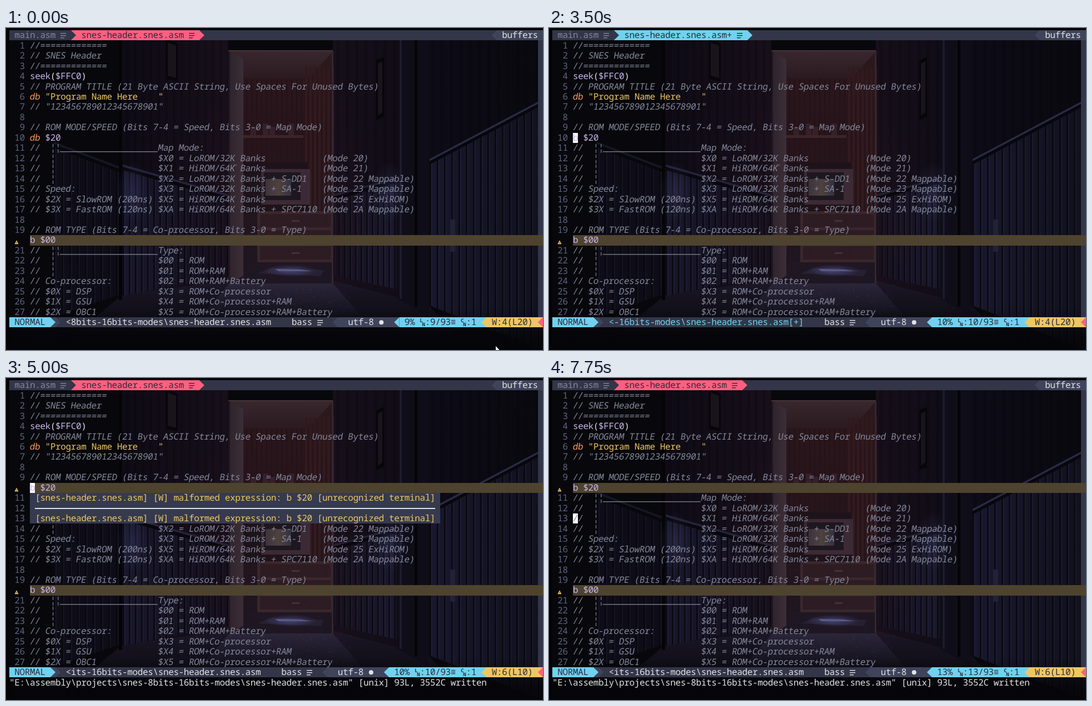
These frames come from a looping animation (966 px wide and 580 px high, 8 s). An HTML page with a canvas:

```html
<!DOCTYPE html>
<html lang="en">
<head>
<meta charset="utf-8">
<title>Editor session</title>
<style>
html, body { margin: 0; width: 100%; height: 100%; overflow: hidden; background: #050507; }
canvas { display: block; }
</style>
</head>
<body>
<canvas id="stage" width="966" height="580"></canvas>
<script>
const W = 966, H = 580, LOOP = 8000;
const CW = 960 / 104, RH = CW * 2, X0 = 6, Y0 = 4, SLANT = 0.17;
const FONT = '"Noto Sans Mono", "DejaVu Sans Mono", monospace';
const C = {
  fg: '#e1e3e4', dark: '#2b2d3a', grey: '#83879a', num: '#5f6380', bar: '#333648', seg: '#3f445b',
  pink: '#fd6080', cyan: '#70d2f0', yellow: '#edc763', orange: '#f89860', lilac: '#c6b6ea',
  warn: '#4e432f', popup: '#363a4e'
};
const g = document.getElementById('stage').getContext('2d');
const X = c => X0 + c * CW, Y = r => Y0 + r * RH;

// ---- file contents ----
const cols = (a, b = '', c = '') => a.padEnd(25) + b.padEnd(32) + c;
const bars = '//  ¦¦' + '_'.repeat(19);
const rule = '//' + '='.repeat(13);
const code = [
  rule, '// SNES Header', rule, 'seek($FFC0)',
  '// PROGRAM TITLE (21 Byte ASCII String, Use Spaces For Unused Bytes)',
  'db "Program Name Here    "', '// "123456789012345678901"', '',
  '// ROM MODE/SPEED (Bits 7-4 = Speed, Bits 3-0 = Map Mode)', 'db $20',
  bars + 'Map Mode:',
  cols('//  ¦', '$X0 = LoROM/32K Banks', '(Mode 20)'),
  cols('//  ¦', '$X1 = HiROM/64K Banks', '(Mode 21)'),
  cols('//  ¦', '$X2 = LoROM/32K Banks + S-DD1', '(Mode 22 Mappable)'),
  cols('// Speed:', '$X3 = LoROM/32K Banks + SA-1', '(Mode 23 Mappable)'),
  cols('// $2X = SlowROM (200ns)', '$X5 = HiROM/64K Banks', '(Mode 25 ExHiROM)'),
  cols('// $3X = FastROM (120ns)', '$XA = HiROM/64K Banks + SPC7110', '(Mode 2A Mappable)'),
  '', '// ROM TYPE (Bits 7-4 = Co-processor, Bits 3-0 = Type)', 'b $00',
  bars + 'Type:',
  cols('//  ¦', '$00 = ROM'),
  cols('//  ¦', '$01 = ROM+RAM'),
  cols('// Co-processor:', '$02 = ROM+RAM+Battery'),
  cols('// $0X = DSP', '$X3 = ROM+Co-processor'),
  cols('// $1X = GSU', '$X4 = ROM+Co-processor+RAM'),
  cols('// $2X = OBC1', '$X5 = ROM+Co-processor+RAM+Battery')
];
const path = 'projects\\snes-8bits-16bits-modes\\snes-header.snes.asm';
const written = `"E:\\assembly\\${path}" [unix] 93L, 3552C written`;
const warning = '[snes-header.snes.asm] [W] malformed expression: b $20 [unrecognized terminal]';

// ---- drawing helpers ----
function text(s, c, r, color, italic) {
  g.font = '16px ' + FONT;
  g.letterSpacing = '0px';
  g.letterSpacing = CW - g.measureText('0').width + 'px';
  g.fillStyle = color;
  g.save();
  g.translate(X(c), Y(r) + 14.2);
  // lean about the middle of the letters
  if (italic) g.transform(1, 0, -SLANT, 1, -SLANT * 5.5, 0);
  g.fillText(s, 0, 0);
  g.restore();
}
function cells(c0, c1, r, color, rows = 1) {
  const x = Math.round(X(c0)), y = Math.round(Y(r));
  g.fillStyle = color;
  g.fillRect(x, y, Math.round(X(c1)) - x, Math.round(Y(r + rows)) - y);
}
function poly(ctx, color, ...p) {
  ctx.fillStyle = color;
  ctx.beginPath();
  for (let i = 0; i < p.length; i += 2) ctx.lineTo(p[i], p[i + 1]);
  ctx.fill();
}
// arrow one cell wide; dir 1 points right, -1 left
function arrow(c, r, color, dir) {
  const a = dir > 0 ? c : c + 1, y = Math.round(Y(r)), b = Math.round(Y(r + 1));
  poly(g, color, X(a), y, X(a + dir), (y + b) / 2, X(a), b);
}
function listIcon(c, r, color) {
  g.fillStyle = color;
  [10, 10, 7].forEach((w, i) => g.fillRect(Math.round(X(c)), Math.round(Y(r)) + 5 + i * 4, w, 1.4));
}
function stacked(a, b, c, r) {
  g.font = 'bold 9px ' + FONT;
  g.letterSpacing = '0px';
  g.fillStyle = C.dark;
  g.fillText(a, X(c), Y(r) + 9);
  g.fillText(b, X(c) + 4, Y(r) + 16.5);
}

// ---- dim hallway behind the text ----
function hallway() {
  const cv = document.createElement('canvas');
  cv.width = W; cv.height = H;
  const b = cv.getContext('2d');
  const fade = (x0, y0, x1, y1, ...stops) => {
    const f = b.createLinearGradient(x0, y0, x1, y1);
    stops.forEach((s, i) => f.addColorStop(i / (stops.length - 1), s));
    return f;
  };
  const box = (color, x, y, w, h) => { b.fillStyle = color; b.fillRect(x, y, w, h); };
  const glow = (x, y, rx, ry, rgb, a) => {
    b.save();
    b.translate(x, y); b.scale(rx, ry);
    const f = b.createRadialGradient(0, 0, 0, 0, 0, 1);
    f.addColorStop(0, `rgba(${rgb},${a})`); f.addColorStop(1, `rgba(${rgb},0)`);
    b.fillStyle = f; b.fillRect(-1, -1, 2, 2);
    b.restore();
  };
  // slanted panelling: top and bottom edges run linearly from x0 to x1
  const panels = (x0, x1, t0, t1, b0, b1, step, fill, line, rail) => {
    poly(b, fill, x0, t0, x1, t1, x1, b1, x0, b0);
    for (let x = x0; x < x1; x += step) {
      const k = (x - x0) / (x1 - x0), y = t0 + (t1 - t0) * k, h = b0 + (b1 - b0) * k - y;
      box(line, x, y, 2.5, h);
      box('rgba(80,78,130,.16)', x + 3, y, 1.5, h);
    }
    poly(b, rail, x0, t0, x1, t1, x1, t1 + 4, x0, t0 + 4);
    poly(b, '#07070c', x0, t0 + 4, x1, t1 + 4, x1, t1 + 10, x0, t0 + 10);
  };
  box('#08080c', 0, 0, W, H);
  box(fade(205, 0, 400, 0, '#0e0b15', '#180f1a'), 208, 0, 192, 480);
  box(fade(588, 0, 966, 0, '#170f1a', '#0d0b15', '#09090f'), 588, 0, 378, 500);
  for (let x = 216; x < 400; x += 14) box('rgba(0,0,0,.16)', x, 22, 5, 270);
  for (let x = 594; x < 966; x += 17) box('rgba(0,0,0,.16)', x, 22, 6, 270);
  poly(b, fade(0, 455, 0, 560, '#1b1726', '#08080d'), 210, 480, 400, 455, 588, 455, 760, 500, 840, 580, 90, 580);
  // left side
  panels(86, 204, 205, 250, 520, 480, 14, '#0e0d17', '#08080e', '#171624');
  box('#050508', 203, 22, 6, 468);
  panels(210, 400, 246, 300, 482, 446, 11, fade(210, 0, 400, 0, '#18172a', '#150f1b'), '#0a0911', '#25223a');
  poly(b, '#07060a', 288, 20, 309, 28, 309, 96, 288, 92);
  poly(b, '#19131c', 291, 26, 306, 32, 306, 90, 291, 86);
  glow(228, 295, 30, 55, '74,78,130', 0.28);
  // right side
  panels(588, 700, 300, 270, 446, 470, 10, fade(588, 0, 700, 0, '#160f1b', '#1a192d'), '#0b0a12', '#211e33');
  poly(b, '#07060a', 666, 58, 680, 52, 680, 160, 666, 166);
  poly(b, '#19131d', 669, 64, 677, 60, 677, 152, 669, 158);
  poly(b, '#0e0d18', 704, 22, 760, 22, 760, 520, 704, 488);
  box('#1d1a2e', 708, 22, 4, 466);
  box('#050508', 735, 22, 5, 480);
  panels(762, 966, 236, 128, 500, 580, 13, fade(762, 0, 966, 0, '#18172c', '#11111d'), '#08080e', '#2a2945');
  box('#222136', 799, 345, 9, 58);
  glow(690, 295, 30, 55, '74,78,130', 0.28);
  // lit room in the doorway
  box(fade(0, 42, 0, 460, '#2c191d', '#25131a', '#20141c', '#1a1521'), 402, 42, 186, 418);
  poly(b, fade(0, 42, 0, 90, '#38272c', '#2b1a20'), 402, 42, 588, 42, 545, 90, 427, 90);
  for (let x = 432; x < 536; x += 9) box('#211117', x, 92, 2, 166);
  for (let x = 538; x < 588; x += 8) box('#311a1d', x, 70, 4, 265);
  box('#3a2526', 427, 193, 108, 5);
  [440, 462, 474, 508].forEach((x, i) => box('#33202a', x, 178 - i % 2 * 6, 10, 15 + i % 2 * 6));
  box('#191118', 427, 242, 116, 92);
  box('#392a35', 459, 254, 88, 64);
  box('#18151f', 464, 260, 66, 50);
  box(fade(464, 0, 516, 0, '#37333e', '#4d4440', '#2d3042'), 467, 272, 46, 30);
  box('#38262b', 452, 330, 136, 92);
  [335, 364, 393].forEach(y => { box('#2a1b22', 457, y, 127, 24); box('#44313a', 514, y + 11, 14, 3); });
  poly(b, '#1c1622', 427, 422, 588, 422, 588, 460, 427, 460);
  poly(b, fade(402, 0, 427, 0, '#2d242d', '#3b2e37'), 403, 42, 427, 56, 427, 446, 403, 462);
  box('#4a3c40', 409, 245, 7, 4);
  box('#44343b', 400, 40, 188, 2);
  box('#1f1620', 400, 42, 3, 418);
  box('#35262e', 586, 42, 3, 418);
  poly(b, '#252033', 452, 442, 478, 432, 572, 436, 566, 447);
  glow(512, 437, 48, 11, '100,106,180', 0.5);
  poly(b, '#585c8c', 484, 434, 530, 435, 550, 438, 490, 438);
  poly(b, fade(0, 455, 0, 520, '#2b273b', '#12101a'), 402, 460, 588, 460, 640, 520, 350, 520);
  for (let i = 0; i < 260; i++) {
    const u = Math.sin(i * 78.233) * 43758.5 % 1, v = Math.sin(i * 12.99) * 9631.7 % 1;
    box('rgba(100,94,140,.13)', 495 + u * 125, 488 + v * 28, 3, 1);
  }
  glow(495, 300, 190, 240, '90,40,45', 0.1);
  box(fade(0, 505, 0, 560, 'rgba(5,5,8,0)', 'rgba(5,5,8,.85)'), 0, 505, W, 75);
  box('#040406', 0, 0, 6, H);
  box('#040406', 0, 0, W, 4);
  return cv;
}
const backdrop = hallway();

// ---- editor parts ----
function tabs(modified) {
  const end = modified ? 38 : 37, hot = modified ? C.cyan : C.pink;
  cells(0, 104, 0, C.bar);
  text('main.asm', 1, 0, C.grey);
  listIcon(10, 0, C.grey);
  cells(12, end, 0, hot);
  arrow(12, 0, C.bar, 1);
  arrow(end, 0, hot, 1);
  text('snes-header.snes.asm' + (modified ? '+' : ''), 14, 0, C.dark);
  listIcon(end - 2, 0, C.dark);
  cells(95, 104, 0, C.seg);
  arrow(94, 0, C.seg, -1);
  text('buffers', 96, 0, C.fg);
}

function codeLine(s, n) {
  if (s.startsWith('//')) {
    text(s.replace(/¦/g, ' '), 4, n, C.grey, true);
    for (let i = 4; i < 6; i++) if (s[i] === '¦') text('¦', 4 + i, n, C.grey);
  } else if (s.startsWith('db')) {
    text('db', 4, n, C.orange, true);
    text(s.slice(3), 7, n, s[3] === '"' ? C.yellow : C.lilac);
  } else {
    text(s.replace(/[()]/g, ' '), 4, n, C.lilac);
    text(s.replace(/[^()]/g, ' '), 4, n, C.fg);
  }
}

function buffer(st) {
  cells(103, 104, 1, C.bar, 27);
  code.forEach((s, i) => {
    const n = i + 1, bad = n === 20 || n === 10 && st.linted;
    if (bad) {
      cells(4, 104, n, C.warn);
      const y = Y(n) + 9;
      poly(g, C.yellow, 19, y, 22.5, y + 7, 15.5, y + 7);
      g.fillStyle = '#33291a';
      g.fillRect(18.5, y + 3, 1, 2.5);
    } else {
      text(String(n).padStart(2), 1, n, C.num);
    }
    if (st.cursor && st.line === n) cells(4, 5, n, '#fff');
    codeLine(n === 10 && st.cut ? s.slice(1) : s, n);
  });
}

function status(st) {
  const r = 28, pct = Math.floor(st.line / 93 * 100) + '%', pos = `:${st.line}/93`;
  const c = 86 - pct.length - 2 - pos.length;
  cells(0, 104, r, C.bar);
  cells(0, 8, r, C.cyan);
  text('NORMAL', 1, r, C.dark);
  cells(8, 9, r, C.seg);
  arrow(8, r, C.cyan, 1);
  arrow(9, r, C.seg, 1);
  const name = path + (st.modified ? '[+]' : '');
  text('<' + name.slice(38 - c), 11, r, st.modified ? C.cyan : C.fg);
  text('bass', c - 22, r, C.fg);
  listIcon(c - 17, r, C.fg);
  arrow(c - 14, r, C.seg, -1);
  cells(c - 13, c - 1, r, C.seg);
  text('utf-8', c - 11, r, C.fg);
  g.fillStyle = C.fg;
  g.beginPath();
  g.arc(X(c - 4.5), Y(r + 0.5), 4, 0, 7);
  g.fill();
  arrow(c - 2, r, C.cyan, -1);
  cells(c - 1, 93, r, C.cyan);
  text(pct, c, r, C.dark);
  stacked('L', 'N', c + pct.length + 1, r);
  text(pos + '≡', 86 - pos.length, r, C.dark);
  stacked('C', 'N', 88, r);
  text(':1', 89, r, C.dark);
  arrow(92, r, C.yellow, -1);
  cells(93, 104, r, C.yellow);
  text(st.linted ? 'W:6(L10)' : 'W:4(L20)', 94, r, C.dark);
  arrow(103, r, C.pink, -1);
}

function popup() {
  cells(4, 84, 11, C.popup, 3);
  text(warning, 5, 11, C.yellow);
  text(warning, 5, 13, C.yellow);
  g.fillStyle = C.fg;
  g.fillRect(52, 234, 720, 2);
}

function pointer(x, y) {
  poly(g, '#fff', x, y, x, y + 14, x + 3.3, y + 11, x + 9.5, y + 10);
}
function beam(x, y) {
  g.fillStyle = '#fff';
  g.fillRect(x, y, 5, 1);
  g.fillRect(x + 2, y, 1, 16);
  g.fillRect(x, y + 15, 5, 1);
}

function draw(t) {
  const within = (a, b) => t >= a && t < b;
  const st = {
    line: t < 2000 ? 9 : t < 6750 ? 10 : t < 7500 ? 9 : t < 7750 ? 11 : 13,
    cursor: t >= 500 && !within(4500, 4750),
    cut: t >= 3500,
    modified: within(3500, 4750),
    linted: t >= 4750
  };
  g.drawImage(backdrop, 0, 0);
  tabs(st.modified);
  buffer(st);
  status(st);
  if (t >= 4500) text(written, 0, 29, C.fg);
  if (within(5000, 7000)) popup();
  if (t < 250) pointer(881, 573);
  else if (t < 500) pointer(814, 567);
  else if (t < 750) pointer(738, 576);
  if (within(7250, 7500)) beam(866, 560);
}

g.textRendering = 'geometricPrecision';
const start = performance.now();
function tick() {
  draw((performance.now() - start) % LOOP);
  requestAnimationFrame(tick);
}
tick();
</script>
</body>
</html>
```
